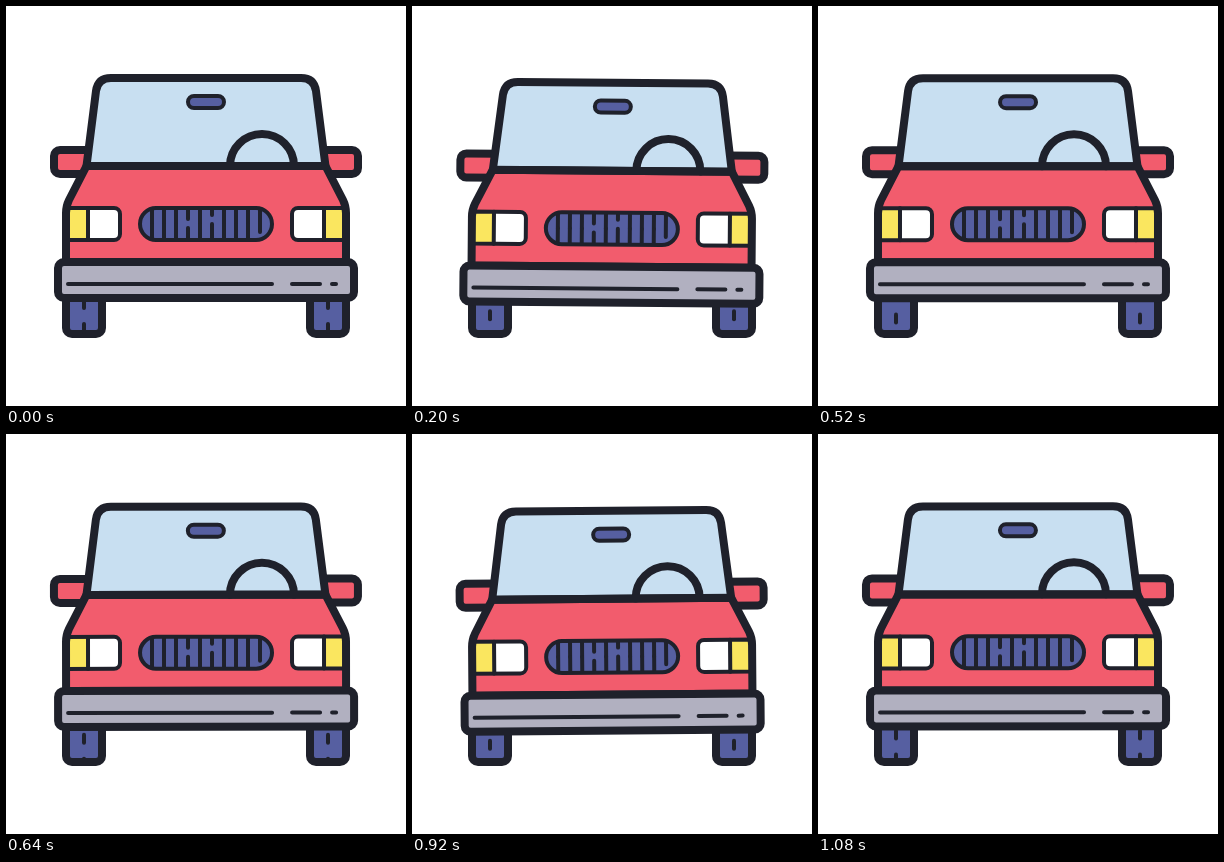
Animation of 400x400 px, one loop 1120 ms. Source, as an HTML page with a canvas:

```html
<!DOCTYPE html>
<html lang="en">
<head>
<meta charset="utf-8">
<title>Car</title>
<style>
html, body { margin: 0; width: 100%; height: 100%; overflow: hidden; background: #fff; }
canvas { display: block; width: 400px; height: 400px; }
</style>
</head>
<body>
<canvas id="stage"></canvas>
<script>
const canvas = document.getElementById('stage');
const ctx = canvas.getContext('2d');
const ratio = window.devicePixelRatio || 1;
canvas.width = canvas.height = 400 * ratio;

const INK = '#1f212b', RED = '#f25c6d', GLASS = '#c8dff1', BLUE = '#565fa1';
const YELLOW = '#fae65f', GREY = '#b1b0c0', WHITE = '#ffffff';
const LOOP = 1120, STEP = 40, HALF = 14;

function shape(path, fill, width) {
  if (fill) {
    ctx.fillStyle = fill;
    ctx.fill(path);
  }
  if (width) {
    ctx.lineWidth = width;
    ctx.stroke(path);
  }
}

function box(x, y, w, h, r, fill, width) {
  const p = new Path2D();
  p.roundRect(x, y, w, h, r);
  shape(p, fill, width);
}

function line(x1, y1, x2, y2, width = 4) {
  ctx.lineWidth = width;
  ctx.beginPath();
  ctx.moveTo(x1, y1);
  ctx.lineTo(x2, y2);
  ctx.stroke();
}

// Draws a part on the left, then its reflection on the right.
function both(draw) {
  draw();
  ctx.save();
  ctx.translate(400, 0);
  ctx.scale(-1, 1);
  draw();
  ctx.restore();
}

const cabin = new Path2D('M80.5 160 L90 85 Q91.8 72 105 72 H295 Q308.2 72 310 85 L319.5 160 Z');
const hood = new Path2D('M80.5 160 L63 194 Q60 200 60 207 V256 H340 V207 Q340 200 337 194 L319.5 160 Z');
const wheelArc = new Path2D('M224 160 A32 32 0 0 1 288 160');

function tire(roll) {
  box(60, 280, 36, 48, 6, BLUE, 8);
  ctx.save();
  ctx.beginPath();
  ctx.rect(60, 284, 36, 44);
  ctx.clip();
  for (let y = 270 - roll * 24; y < 330; y += 24) line(78, y, 78, y + 8);
  ctx.restore();
}

function sideMirror() {
  box(48, 144, 44, 24, 6, RED, 8);
}

function headlight() {
  box(60, 202, 54, 32, [0, 6, 6, 0], WHITE);
  box(60, 202, 22, 32, 0, YELLOW);
  box(60, 202, 54, 32, [0, 6, 6, 0], null, 4);
  line(82, 202, 82, 234);
}

function grille() {
  box(134, 202, 132, 32, 16, BLUE);
  ctx.save();
  ctx.beginPath();
  ctx.roundRect(134, 202, 132, 32, 16);
  ctx.clip();
  const gaps = { 182: [213, 222], 206: [209, 218], 254: [226, 240] };
  for (let x = 146; x <= 254; x += 12) {
    const [a, b] = gaps[x] || [218, 218];
    line(x, 200, x, a);
    line(x, b, x, 242);
  }
  ctx.restore();
  box(134, 202, 132, 32, 16, null, 4);
}

function bumper() {
  box(52, 256, 296, 36, 6, GREY, 8);
  line(62, 278, 266, 278);
  line(286, 278, 314, 278);
  line(326, 278, 330, 278);
}

function body() {
  both(sideMirror);
  shape(hood, RED);
  shape(cabin, GLASS);
  shape(wheelArc, null, 8);
  both(headlight);
  shape(hood, null, 8);
  shape(cabin, null, 8);
  box(182, 90, 36, 12, 6, BLUE, 4);
  grille();
  bumper();
}

// One dip per half loop: down in 6 steps, up in 8; the second half runs backwards.
function dip(step) {
  const s = step <= HALF ? step : 2 * HALF - step;
  const u = s < 6 ? s / 6 : (HALF - s) / 8;
  return (1 - Math.cos(Math.PI * u)) / 2;
}

function draw(time) {
  const step = Math.floor((time % LOOP + 0.5) / STEP) % (2 * HALF);
  const d = dip(step);
  const tilt = (step < HALF ? 0.5 : -0.5) * d * Math.PI / 180;

  ctx.setTransform(ratio, 0, 0, ratio, 0, 0);
  ctx.fillStyle = WHITE;
  ctx.fillRect(0, 0, 400, 400);
  ctx.strokeStyle = INK;
  ctx.lineCap = ctx.lineJoin = 'round';

  const roll = (step * 3 / (2 * HALF)) % 1;
  both(() => tire(roll));

  ctx.translate(200, 200 + 5 * d);
  ctx.rotate(tilt);
  ctx.translate(-200, -200);
  body();
}

const start = performance.now();
function tick(now) {
  draw(Math.max(0, now - start));
  requestAnimationFrame(tick);
}
draw(0);
requestAnimationFrame(tick);
</script>
</body>
</html>
```
